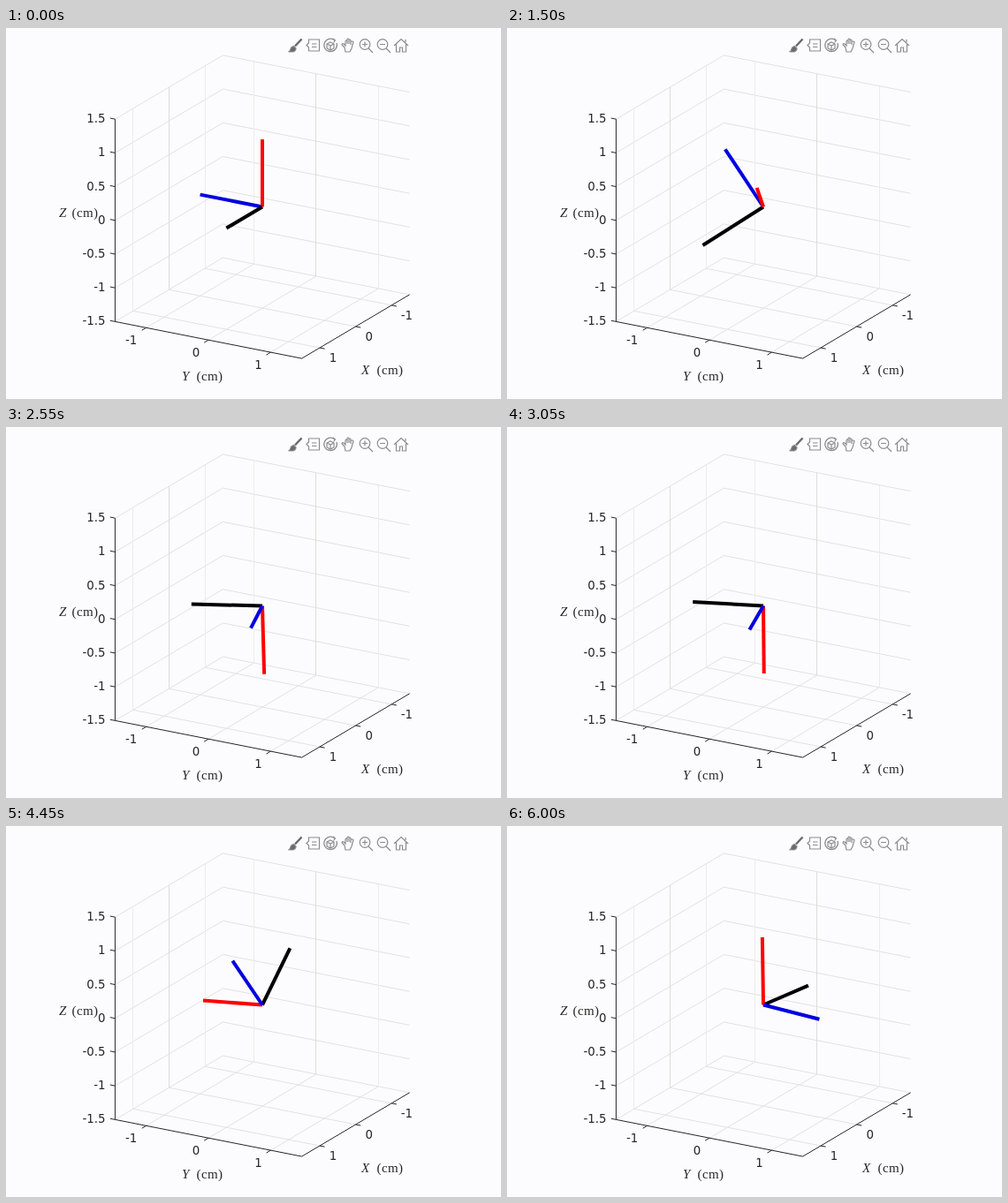
Animation, 560 px wide and 420 px high, one loop 6050 ms. Source, as an HTML page:

```html
<!DOCTYPE html>
<html lang="en">
<head>
<meta charset="utf-8">
<title>Spinning rigid body</title>
<style>
  html, body { margin: 0; width: 100%; height: 100%; overflow: hidden; background: #fcfcfe; }
  svg { display: block; fill: none; }
  #grid { stroke: #e2e2e2; }
  #posts { stroke: #ececec; shape-rendering: crispEdges; }
  #zero { stroke: #dcdcd8; shape-rendering: crispEdges; }
  #axes { stroke: #262626; }
  text { fill: #262626; }
  #ticks { font: 13.3px "DejaVu Sans", sans-serif; text-anchor: middle; }
  #names { font: 15px "Liberation Serif", serif; letter-spacing: 0.4px; }
  #tools { stroke: #8c8c8c; stroke-width: 1.2; }
  #body { stroke-width: 4; }
</style>
</head>
<body>
<svg width="560" height="420" viewBox="0 0 560 420">
  <path id="grid"/><path id="posts"/><path id="zero"/><path id="axes"/>
  <g id="ticks"></g>
  <g id="names">
    <text x="60" y="213.5"><tspan font-style="italic">Z</tspan><tspan x="74.5">(cm)</tspan></text>
    <text x="199" y="398.5"><tspan font-style="italic">Y</tspan><tspan x="215.5">(cm)</tspan></text>
    <text x="402" y="391.5"><tspan font-style="italic">X</tspan><tspan x="419.5">(cm)</tspan></text>
  </g>
  <g id="tools">
    <path d="M334.500 12.500l-7.500 8" stroke="#6a6a6a" stroke-width="2.4"/>
    <path d="M319.500 27q2-1 2.500-3.500t3.500-3l2.500 2.500q0 3-3 4z" fill="#6a6a6a"/>
    <path d="M342.500 17v-4h12v13h-12v-4l-2.500-2.500zM346 18h5.500M346 21.500h5.500"/>
    <path d="M372 14a7.300 7.300 0 1 0 2 3M370 12l2.500 2-2 2.500M367 16l4 2v5l-4 2-4-2v-5zM363 18l4 2 4-2M367 20v5"/>
    <path d="M383 22l-3-3q0-2 2-1l2 2v-5q1-2 2 0v3-5q1-2 2 0v5-4q1-2 2 0v5-3q2-2 3 0-1 3-2 7l-2 4h-5z"/>
    <circle cx="406" cy="18.500" r="5.800"/>
    <path d="M410 23l5 5M403 18.500h6M406 15.500v6"/>
    <circle cx="426" cy="18.500" r="5.800"/>
    <path d="M430 23l5 5M423 18.500h6"/>
    <path d="M439 20l8-7.500 8 7.500M441.500 18.500V27h4v-5h3v5h4v-8.500M452 16v-3"/>
  </g>
  <g id="body"></g>
</svg>
<script>
const $ = id => document.getElementById(id);
const SCALE = 81.3, AZ = 120 * Math.PI / 180, EL = 20 * Math.PI / 180;
const ca = Math.cos(AZ), sa = Math.sin(AZ), ce = Math.cos(EL), se = Math.sin(EL);

// Orthographic view: screen x, screen y, and depth towards the viewer
const project = ([x, y, z]) => [
  290 + SCALE * (x * ca + y * sa),
  202.5 - SCALE * (z * ce - (x * sa - y * ca) * se),
  ce * (x * sa - y * ca) + z * se
];
const point = p => project(p).slice(0, 2).map(v => v.toFixed(2)).join(" ");
const line = (...pts) => "M" + pts.map(point).join("L");

// Box, grid and ticks
const M = 1.5, OUT_X = M + 0.12, OUT_Y = M + 0.08;
let grid = "", posts = "", zero = "";
let axes = line([M, -M, M], [M, -M, -M], [M, M, -M], [-M, M, -M]);

function label(p, dx, dy, text, anchor) {
  const [x, y] = project(p);
  const t = document.createElementNS("http://www.w3.org/2000/svg", "text");
  t.setAttribute("x", x + dx);
  t.setAttribute("y", y + dy);
  if (anchor) t.setAttribute("text-anchor", anchor);
  t.textContent = text;
  $("ticks").append(t);
}

for (let z = -M; z <= M; z += 0.5) {
  grid += line([M, -M, z], [-M, -M, z], [-M, M, z]);
  axes += line([M, -M, z], [M, -OUT_Y, z]);
  label([M, -M, z], -11, 4, z, "end");
}
for (const v of [-1, 0, 1]) {
  grid += line([v, -M, -M], [v, M, -M]) + line([-M, v, -M], [M, v, -M]);
  const walls = line([v, -M, -M], [v, -M, M]) + line([-M, v, -M], [-M, v, M]);
  if (v) posts += walls; else zero += walls;
  axes += line([M, v, -M], [OUT_X, v, -M]) + line([v, M, -M], [v, OUT_Y, -M]);
  label([M, v, -M], v < 0 ? -17 : -14, 19, v);
  label([v, M, -M], v < 0 ? 17 : 15, 16, v);
}
Object.entries({ grid, posts, zero, axes }).forEach(([id, d]) => $(id).setAttribute("d", d));

// Torque-free rotation, spun close to the unstable middle axis.
// State: angular velocity in the body, then the three body axes in space.
const [I1, I2, I3] = [2, 3, 4];
function rate(s) {
  const [p, q, r] = s;
  const d = [(I2 - I3) / I1 * q * r, (I3 - I1) / I2 * r * p, (I1 - I2) / I3 * p * q];
  for (let i = 3; i < 6; i++) {
    const a = s[i], b = s[i + 3], c = s[i + 6];
    d[i] = r * b - q * c;
    d[i + 3] = p * c - r * a;
    d[i + 6] = q * a - p * b;
  }
  return d;
}
const add = (s, d, h) => s.map((v, i) => v + h * d[i]);
function step(s, h) {
  const k1 = rate(s), k2 = rate(add(s, k1, h / 2));
  const k3 = rate(add(s, k2, h / 2)), k4 = rate(add(s, k3, h));
  return s.map((v, i) => v + h / 6 * (k1[i] + 2 * k2[i] + 2 * k3[i] + k4[i]));
}

const COUNT = 121, STEP_MS = 50, SUB = 20, LAG = 0.7;
let state = [0.1, 15, 0.1, 1, 0, 0, 0, 0, 1, 0, -1, 0];
const poses = [state];
for (let n = 1; n < COUNT; n++) {
  const dt = (n === 1 ? 1 - LAG : 1) / 24;
  for (let k = 0; k < SUB; k++) state = step(state, dt / SUB);
  poses.push(state);
}

const COLORS = ["#000", "#f00", "#0000e0"];
function draw(s) {
  $("body").innerHTML = COLORS
    .map((color, i) => ({ color, tip: s.slice(3 + 3 * i, 6 + 3 * i) }))
    .sort((a, b) => project(a.tip)[2] - project(b.tip)[2])
    .map(({ color, tip }) => `<path stroke="${color}" d="${line([0, 0, 0], tip)}"/>`)
    .join("");
}

const start = performance.now();
function frame() {
  const n = Math.floor((performance.now() - start) / STEP_MS) % COUNT;
  draw(poses[n]);
  requestAnimationFrame(frame);
}
frame();
</script>
</body>
</html>
```
